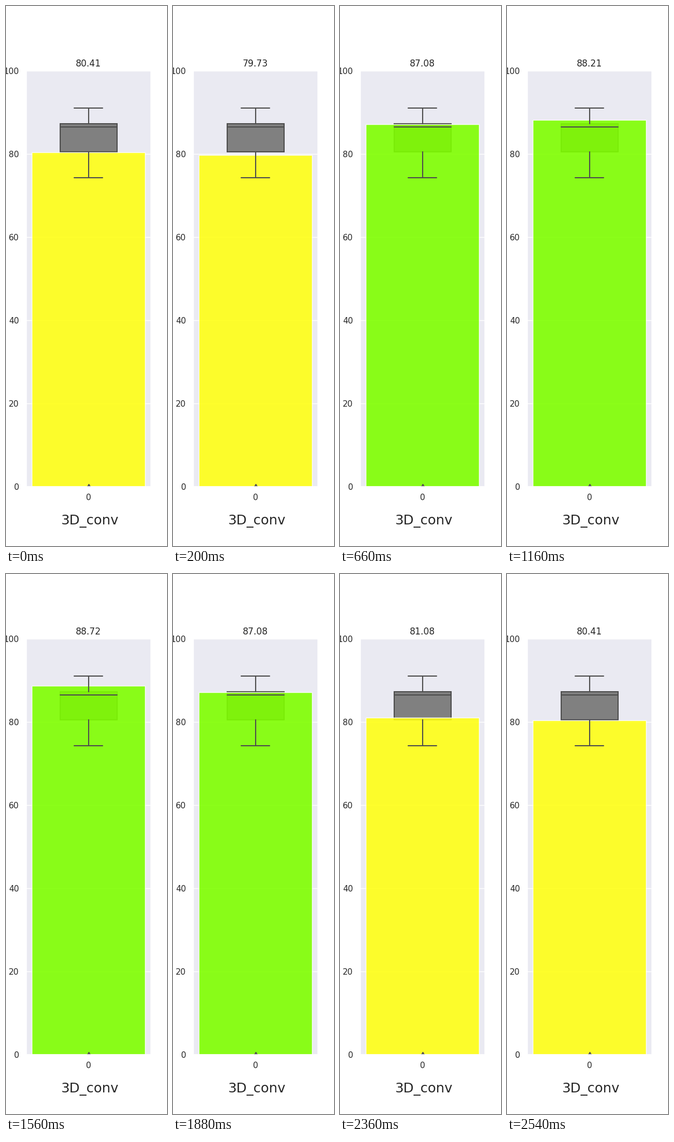
These frames come from a looping animation (300 by 1000 pixels, 2560 ms). A matplotlib script:

```python
import math

import matplotlib.pyplot as plt
from matplotlib.animation import FuncAnimation
from matplotlib.patches import Rectangle

DARK, INK = "#4d4d4d", "0.15"
BAR_WIDTH, BOX_WIDTH, CAP_WIDTH = 0.8, 0.4, 0.2
LOW, Q1, MEDIAN, Q3, HIGH = 74.32, 80.55, 86.52, 87.3, 91.04

CLASSES = [(119, 148), (166, 201), (155, 178), (173, 195)]  # typical hits, samples
STEPS = 16  # frames per class
HALF = STEPS * len(CLASSES)


def setting(step):
    """Short runs first, then one long hold and a last single frame."""
    return min(step, 1 + step // 2, 6) + step // (STEPS - 1)


def score_at(frame):
    """Percentage of hits; the second half plays the first one backwards."""
    position = min(frame, 2 * HALF - 1 - frame)
    group, step = divmod(position, STEPS)
    hits, samples = CLASSES[group]
    wobble = round(1.9 * math.sin(3 * setting(step)))
    return 100 * (hits + wobble) / samples


def bar_color(score):
    return "#ffff15" if score < 81.5 else "chartreuse"


plt.rcParams["font.family"] = "DejaVu Sans"
fig = plt.figure(figsize=(3, 10), dpi=100, facecolor="white")
ax = fig.add_axes([0.125, 0.11, 0.775, 0.77], facecolor="#eaeaf2")
ax.set(xlim=(-0.44, 0.44), ylim=(0, 100), xticks=[0], yticks=range(0, 101, 20))
ax.set_axisbelow(True)
ax.yaxis.grid(True, color="white", linewidth=1)
ax.tick_params(length=0, pad=9.5, labelsize=11, labelcolor=INK)
for spine in ax.spines.values():
    spine.set(color="white", linewidth=1.25)
fig.text(0.52, 0.04, "3D_conv", fontsize=18, color=INK, ha="center")


def stroke(xs, ys):
    ax.plot(xs, ys, color=DARK, linewidth=1.5, solid_capstyle="round")


def level(y, width):
    stroke([-width / 2, width / 2], [y, y])


ax.add_patch(Rectangle((-BOX_WIDTH / 2, Q1), BOX_WIDTH, Q3 - Q1,
                       facecolor="#808080", edgecolor=DARK, linewidth=1.5))
bar = ax.add_patch(Rectangle((-BAR_WIDTH / 2, 0), BAR_WIDTH, 0,
                             edgecolor="white", linewidth=1, alpha=0.9))
stroke([0, 0], [Q1, LOW])
stroke([0, 0], [Q3, HIGH])
level(LOW, CAP_WIDTH)
level(HIGH, CAP_WIDTH)
level(MEDIAN, BOX_WIDTH)
ax.plot([0], [0], marker="d", markersize=5, color=DARK)
title = ax.set_title("", fontsize=12, color=INK, pad=6)


def update(frame):
    score = score_at(frame)
    bar.set_height(score)
    bar.set_facecolor(bar_color(score))
    title.set_text(str(round(score, 2)))
    return bar, title


animation = FuncAnimation(fig, update, frames=2 * HALF, interval=20,
                          repeat=True, repeat_delay=0, blit=False)
plt.show()
```
